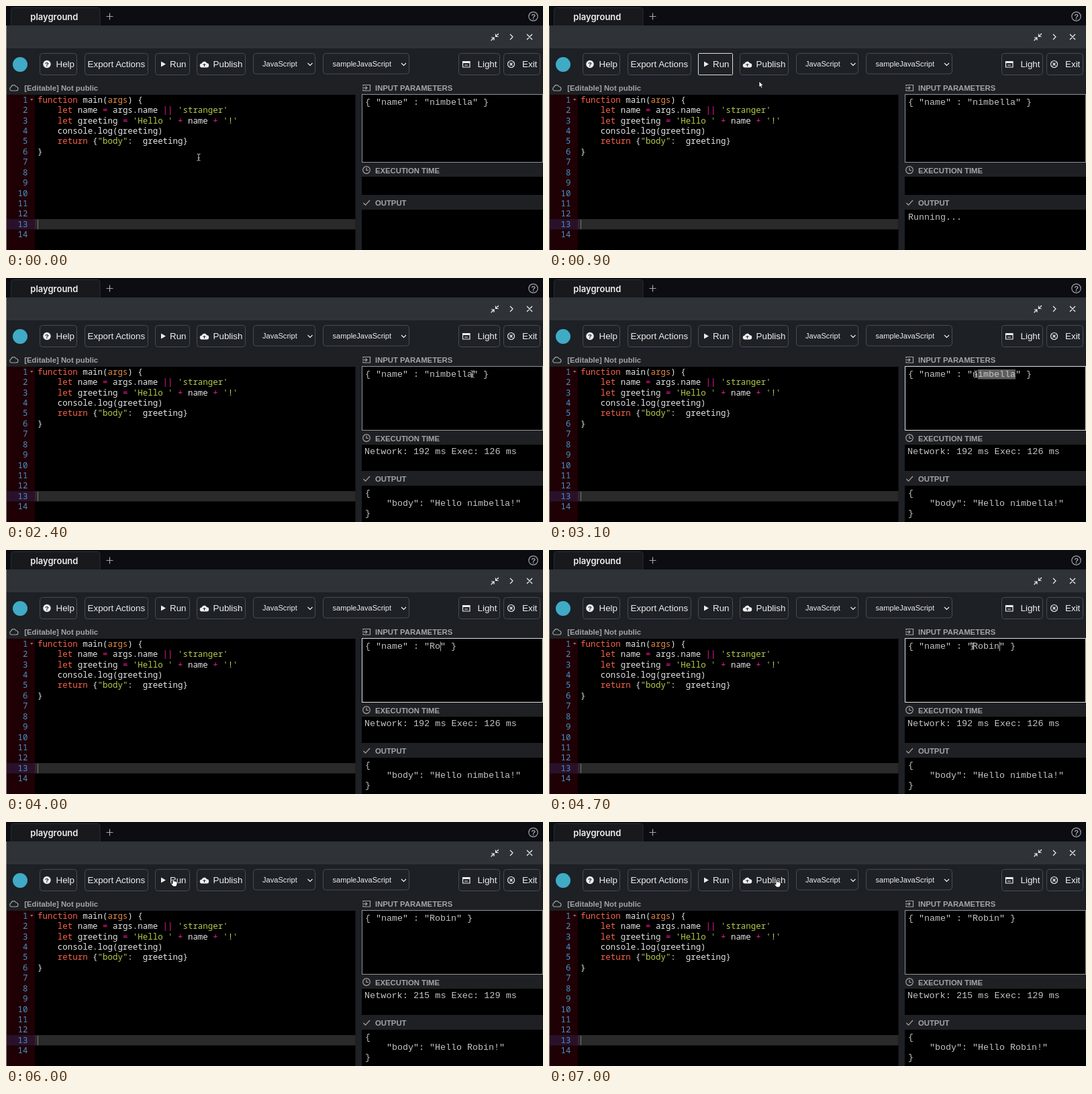
An HTML page for the animation above (7100 ms loop, 800x363 px).

```html
<!DOCTYPE html>
<html lang="en">
<head>
<meta charset="utf-8">
<title>Playground</title>
<style>
  html, body { margin: 0; width: 100%; height: 100%; overflow: hidden; background: #0b0d12; }
  svg { display: block; width: 100vw; height: 100vh; }
  text { white-space: pre; fill: #eee; }
  .tab { font: 600 13px Inter, sans-serif; }
  .button { font: 13.4px "Liberation Sans", Arial, sans-serif; }
  .select { font: 11.1px "Liberation Sans", Arial, sans-serif; }
  .head { font: bold 11.3px "Liberation Sans", Arial, sans-serif; fill: #a2a4a7; }
  .code { font: 12.45px "Noto Sans Mono", "DejaVu Sans Mono", monospace; fill: #e4e4e4; }
  .number { fill: #4690c8; text-anchor: end; }
  .out { font: 13.33px "Liberation Mono", "Courier New", monospace; fill: #c4c4c4; }
  .keyword { fill: tomato; }
  .operator { fill: deeppink; }
  .string { fill: #b9ca4a; }
  .param { fill: #e78c45; }
  .strip { fill: #1f2023; }
  .icon { fill: none; stroke: #a2a4a7; stroke-width: 1.2; }
  .light { stroke: #eee; }
</style>
</head>
<body>
<svg viewBox="0 0 800 363" preserveAspectRatio="none">
  <!-- tabs and window bar -->
  <rect width="800" height="363" fill="#0b0d12"/>
  <path d="M7.5 30V6q0-3.500 3.500-3.500H136.500q3.500 0 3.500 3.500V30" fill="#17191d" stroke="#2b2e33"/>
  <text class="tab" x="36.300" y="21.300">playground</text>
  <path class="icon" d="M149.500 15.500h10M154.500 10.500v10"/>
  <circle class="icon" cx="785.500" cy="15.500" r="6.700"/>
  <text class="head" x="782.200" y="19.500">?</text>
  <rect y="29" width="800" height="34" fill="#2f3338"/>
  <path class="icon light" d="M734 41l-4.500 4.500m0-4v4h4M722.500 51.500l4.500-4.500m-4 0h4v4M751 42l4 4-4 4M776 42l8 8m0-8l-8 8"/>
  <rect y="63" width="800" height="300" fill="#1d2024"/>
  <circle cx="21" cy="87" r="11" fill="#3fabc6"/>
  <g id="buttons"></g>

  <!-- button icons -->
  <circle cx="61" cy="86.500" r="5.700" fill="#eee"/>
  <text x="61" y="90" text-anchor="middle" style="font:bold 9.500px 'Liberation Sans',sans-serif;fill:#1d2024">?</text>
  <path d="M231 82.500v8l7-4z" fill="#eee"/>
  <path d="M292 91.500a3 3 0 0 1-.5-6 4 4 0 0 1 7.500-.5 3.200 3.200 0 0 1 0 6.500z" fill="#eee"/>
  <path d="M295.500 90v-4m-2 2l2-2 2 2" stroke="#1d2024" fill="none"/>
  <path class="icon light" d="M680.500 82.500h10.500v8.500h-10.500zM680 83.500h11M680 84.500h11M683 88h5"/>
  <circle class="icon light" cx="752.500" cy="86.500" r="5"/>
  <path class="icon light" d="M750.500 84.500l4 4m0-4l-4 4M449.500 85l3.500 3.500 3.500-3.500M589 85l3.500 3.500 3.500-3.500"/>

  <!-- editor -->
  <rect class="strip" y="111" width="520" height="21"/>
  <path class="icon" d="M7.500 126a3 3 0 0 1 0-5.500 4 4 0 0 1 7.500-.500 3 3 0 0 1 0 6z"/>
  <text class="head" x="27.300" y="126.300">[Editable] Not public</text>
  <rect y="132" width="520.500" height="231"/>
  <rect y="132" width="43" height="231" fill="#1f0004"/>
  <rect y="317" width="43" height="15.400" fill="#2a112a"/>
  <rect x="43" y="317" width="477.500" height="15.400" fill="#2a2a2a"/>
  <path d="M47.500 318v14" stroke="#777"/>
  <path d="M36 138h4.500l-2.200 3z" fill="#777"/>
  <g id="code"></g>
  <path d="M.5 29v334" stroke="#888"/>

  <!-- input parameters -->
  <rect class="strip" x="530" y="111" width="270" height="21"/>
  <path class="icon" d="M532 119.500v-2h10.500v8.500h-10.500v-2M531 121.800h7m-2.500-2.500l2.500 2.500-2.500 2.500"/>
  <text class="head" x="550" y="126.300">INPUT PARAMETERS</text>
  <rect id="box" x="530.500" y="131.500" width="269"/>
  <rect id="selection" y="136" height="14.500" fill="#5e5e5e"/>
  <text id="input" class="out" x="535" y="147"></text>
  <path id="caret" stroke="#aaa"/>

  <!-- results -->
  <g id="timePanel">
    <rect class="strip" x="530" y="3" width="270" height="19"/>
    <circle class="icon" cx="537" cy="12" r="5.300"/>
    <path class="icon" d="M537 8.500v4h3"/>
    <text class="head" x="550" y="16.600">EXECUTION TIME</text>
    <rect id="timeBox" x="530" y="22" width="270"/>
    <text id="timing" class="out" x="534" y="35.500" style="font-size:13.5px"></text>
  </g>
  <g id="outputPanel">
    <rect class="strip" x="530" y="2" width="270" height="20"/>
    <path class="icon" d="M532.500 12l3 3.200 6.500-7.200"/>
    <text class="head" x="550" y="16.200">OUTPUT</text>
    <rect x="530" y="22" width="270" height="70"/>
    <g id="output"></g>
  </g>

  <g id="mouse">
    <path id="beam" d="M-2.500-5q2.500 0 2.500 1.500v7q0 1.500-2.500 1.500M2.500-5q-2.500 0-2.500 1.500M0 3.500q0 1.500 2.500 1.500M-1.500 1h3" fill="none" stroke="#ccc"/>
    <path id="arrow" d="M0-4v9l2-1.700 1.500 3 1.500-.700-1.500-3h2.800z" fill="#fff" stroke="#000" stroke-width=".7"/>
    <path id="hand" d="M-2 1v-5q1-1.500 2 0v3q1-.600 1.800.200 1-.500 1.700.400 1.300-.300 1.500 1v3l-1.500 3.400h-4.500l-3.300-4q0-1.700 2.300-.200z" fill="#fff" stroke="#000" stroke-width=".8"/>
  </g>
</svg>
<script>
const LOOP = 7100, GUEST = 'Robin', CELL = 8, TEXT_X = 535;
const $ = id => document.getElementById(id);
const set = (id, attrs) => { for (const k in attrs) $(id).setAttribute(k, attrs[k]); };
const show = (id, on) => { $(id).style.display = on ? '' : 'none'; };
const label = (cls, x, y, s) => `<text class="${cls}" x="${x}" y="${y}">${s}</text>`;

// x, width, text x, label, text class
const buttons = [
  [50, 56, 74.5, 'Help', 'button'], [117, 95, 121.5, 'Export Actions', 'button'],
  [222, 52, 244, 'Run', 'button'], [284, 73, 308.5, 'Publish', 'button'],
  [368, 93, 382, 'JavaScript', 'select'], [472, 129, 486.5, 'sampleJavaScript', 'select'],
  [674, 62, 702.5, 'Light', 'button'], [741, 55, 769, 'Exit', 'button']
];
$('buttons').innerHTML = buttons.map(([x, w, tx, s, cls]) =>
  `<rect id="${s}" x="${x + .5}" y="70.500" width="${w - 1}" height="${cls === 'button' ? 32 : 30.5}" rx="4" fill="#1e2125" stroke="#484b50"/>` +
  label(cls, tx, cls === 'button' ? 91 : 90, s)).join('');

const source = `function main(args) {
    let name = args.name || 'stranger'
    let greeting = 'Hello ' + name + '!'
    console.log(greeting)
    return {"body":  greeting}
}`.split('\n');
const tokens = /('[^']*'|"[^"]*")|\b(function|let|return)\b|(\|\||[=+])|(args(?=\)))/g;
const kinds = ['string', 'keyword', 'operator', 'param'];
const highlight = line => line.replace(tokens, (m, ...groups) =>
  `<tspan class="${kinds[groups.slice(0, 4).findIndex(Boolean)]}">${m}</tspan>`);
$('code').innerHTML = Array.from({ length: 14 }, (_, i) => {
  const y = 143.7 + i * 15.43;
  return label('code number', 32.5, y, i + 1) + label('code', 47, y, highlight(source[i] || ''));
}).join('');

// time, x, y
const path = [
  [0, 287, 225], [100, 287, 225], [450, 252, 89], [700, 252, 89], [900, 313, 116],
  [1500, 569, 142], [1700, 569, 142], [2300, 695, 143], [2600, 695, 143],
  [3100, 636, 143], [3250, 631, 143], [4700, 631, 143], [5150, 250, 89],
  [6300, 250, 89], [6900, 340, 90], [7100, 340, 90]
];
function mouseAt(t) {
  const i = path.findIndex(p => p[0] > t), [t0, x0, y0] = path[i - 1], [t1, x1, y1] = path[i];
  const u = (t - t0) / (t1 - t0), e = u * u * (3 - 2 * u);
  return [x0 + (x1 - x0) * e, y0 + (y1 - y0) * e];
}

let lastOutput;
function setOutput(lines) {
  const key = lines.join('\n');
  if (key === lastOutput) return;
  lastOutput = key;
  $('output').innerHTML = lines.map((s, i) => label('out', TEXT_X, 37 + i * 15, s)).join('');
}

function draw(t) {
  const [x, y] = mouseAt(t);
  const overButton = y > 70 && y < 103 && buttons.some(b => x > b[0] && x < b[0] + b[1]);
  const overText = y > 132 && (x < 520 || x > 530);
  set('mouse', { transform: `translate(${x} ${y})` });
  show('mouse', t < 3500 || t >= 4700);
  show('hand', overButton);
  show('beam', overText);
  show('arrow', !overButton && !overText);

  const runFocused = (t >= 600 && t < 1300) || (t >= 5250 && t < 6000);
  set('Run', { stroke: runFocused ? '#ddd' : '#484b50', rx: runFocused ? 1 : 4 });

  // selecting and retyping the name
  const typed = t < 3700 ? 0 : Math.min(5, 1 + Math.floor((t - 3700) / 220));
  const name = typed ? GUEST.slice(0, typed) : 'nimbella';
  $('input').textContent = `{ "name" : "${name}" }`;
  const end = TEXT_X + 20 * CELL;
  const start = Math.min(end, TEXT_X + Math.round((x - TEXT_X) / CELL) * CELL);
  const selecting = t >= 2600 && !typed;
  set('selection', { x: start, width: selecting ? end - start : 0 });
  show('caret', typed && t < 5250);
  set('caret', { d: `M${TEXT_X + (12 + typed) * CELL + .5} 136.500v14` });

  // results
  const done = t >= 1300, again = t >= 6000;
  const timeY = done ? 226 : 232, outputY = done ? 287 : 281;
  const inputFocused = t >= 2600 && t < 5250;
  set('box', { height: timeY - 131, stroke: inputFocused ? '#e0e0e0' : '#929292' });
  set('timePanel', { transform: `translate(0 ${timeY})` });
  set('outputPanel', { transform: `translate(0 ${outputY})` });
  set('timeBox', { height: outputY - timeY - 22 });
  $('timing').textContent = again ? 'Network: 215 ms Exec: 129 ms' : done ? 'Network: 192 ms Exec: 126 ms' : '';
  const running = (t >= 600 && !done) || (t >= 5400 && !again);
  setOutput(running ? ['Running...'] : !done ? [] :
    ['{', `    "body": "Hello ${again ? GUEST : 'nimbella'}!"`, '}']);
}

function frame() {
  draw(performance.now() % LOOP);
  requestAnimationFrame(frame);
}
frame();
</script>
</body>
</html>
```
